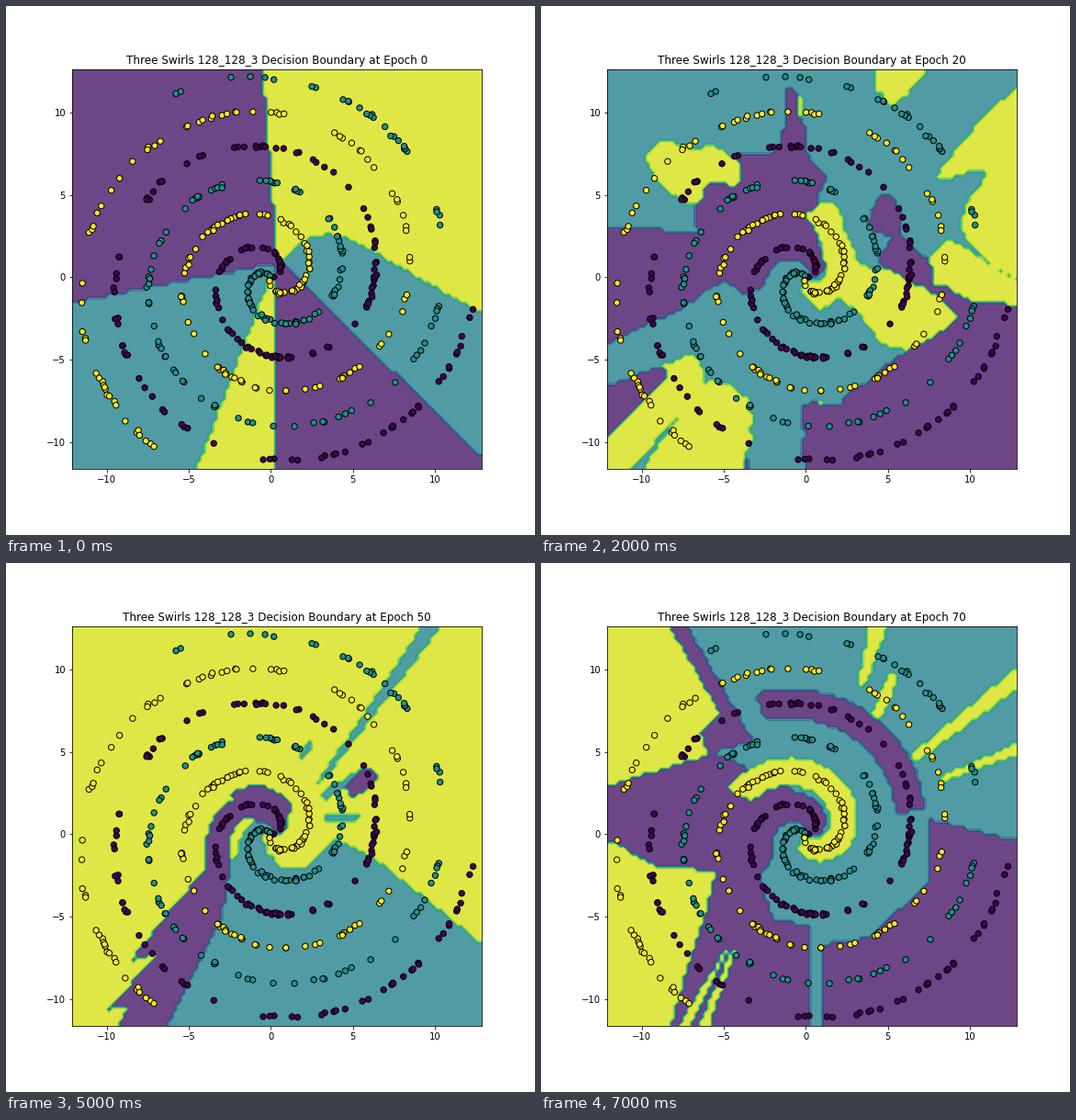
These frames come from a looping animation (576x576 px, 8000 ms). A matplotlib script:

```python
import numpy as np
import matplotlib.pyplot as plt
from matplotlib.animation import FuncAnimation
from matplotlib.path import Path

PURPLE, TEAL, YELLOW = 0, 1, 2
STEP = 0.25
LEFT, BOTTOM = -12.12, -11.63
PHASE = np.array([0, 1, -1]) * 2 * np.pi / 3   # start angle of each arm
rng = np.random.default_rng(4)

xs = LEFT + STEP * np.arange(101)
ys = BOTTOM + STEP * np.arange(98)
gx, gy = np.meshgrid(xs, ys)
# Shapes reach the frame, so the outermost nodes are tested just inside it
px, py = np.clip(gx, -12, 12.7), np.clip(gy, -11.5, 12.5)
radius, angle = np.hypot(px, py), np.arctan2(py, px)


class Field:
    """Class map on the grid, painted shape by shape."""

    def __init__(self, base):
        self.z = np.full(gx.shape, float(base))

    def poly(self, cls, *points):
        inside = Path(points).contains_points(np.column_stack([px.ravel(), py.ravel()]))
        self.z[inside.reshape(gx.shape)] = cls

    def wedge(self, cls, apex, start, stop):
        a = np.degrees(np.arctan2(py - apex[1], px - apex[0])) - start
        self.z[a % 360 < stop - start] = cls

    def streak(self, cls, a, b, wide, tip=None):
        """Line from a to b whose half width runs from wide to tip."""
        tip = wide if tip is None else tip
        dx, dy = b[0] - a[0], b[1] - a[1]
        u = np.clip(((px - a[0]) * dx + (py - a[1]) * dy) / (dx * dx + dy * dy), 0, 1)
        gap = np.hypot(px - a[0] - u * dx, py - a[1] - u * dy)
        self.z[gap < wide + (tip - wide) * u] = cls

    def swirl(self, cls, start, stop, width):
        """Band along the arm of a class."""
        turn = (angle - PHASE[cls]) % (2 * np.pi)
        t = turn + 2 * np.pi * np.round((radius - turn) / (2 * np.pi))
        self.z[(abs(radius - t) < width) & (t >= start) & (t <= stop)] = cls

    def core(self, purple, teal, yellow, width):
        for cls, stop in enumerate((purple, teal, yellow)):
            self.swirl(cls, 0, stop, width)


def epoch_0():
    f = Field(TEAL)
    f.wedge(PURPLE, (0.4, 0.9), 94, 191)
    f.poly(YELLOW, (-0.5, 12.6), (12.9, 12.6), (12.9, -2.2), (5, 2.3), (3.5, 2.7),
           (2, 2.3), (0.4, 0.9))
    f.wedge(PURPLE, (0.3, 1.2), 270, 316)
    f.wedge(YELLOW, (0.3, 0.8), 249, 270)
    return f.z


def epoch_10():
    f = Field(TEAL)
    f.poly(PURPLE, (-8.3, 7.4), (-4.4, 7), (-2, 8.8), (-1.7, 12.6), (-0.8, 12.6),
           (0.5, 7), (3.5, 8), (6.2, 11), (2.5, 5.2), (0.9, 4.5), (0.8, 0.8),
           (-2.5, 2), (-7, 4.6))
    f.streak(PURPLE, (3.3, 2.4), (6.8, 8), 0.7, 0.3)
    f.poly(PURPLE, (4.4, 1.3), (8.5, 1), (12.9, -1.8), (12.9, -11.6), (-0.8, -11.6),
           (-1, -5), (0.5, -7.5), (2, -5.3), (3.6, -6), (8.2, -2.8), (5.7, -1))
    f.poly(PURPLE, (-12.2, 1.5), (-9, 1.3), (-7.4, 0), (-7.4, -0.8), (-12.2, -2.2))
    f.core(3.4, 3.4, 2.6, 0.7)
    f.streak(YELLOW, (1.6, 4.4), (1.6, 1), 0.65)
    f.streak(YELLOW, (2, 1), (5, -2.8), 0.9, 1.4)
    f.streak(YELLOW, (0.8, -1), (0.9, -7.8), 0.7, 0.15)
    f.streak(YELLOW, (-0.3, -3), (-3.6, -10.5), 0.35, 0.2)
    f.poly(YELLOW, (-12.2, -7), (-6.9, -4.4), (-5, -5.6), (-3, -4.6), (-3.6, -11.6),
           (-12.2, -11.6))
    f.poly(YELLOW, (4.4, 12.6), (7.6, 12.6), (4.4, 9.1))
    f.poly(YELLOW, (12.1, 12.6), (9.3, 9), (7.8, 5.8), (12.9, 7.2), (12.9, 12.6))
    f.poly(YELLOW, (12.5, 7.2), (10.5, 4.6), (11.3, 2.2), (12.9, 1.5), (12.9, 7.2))
    return f.z


def epoch_30():
    f = Field(TEAL)
    f.poly(YELLOW, (-12.2, 12.2), (-6.9, 8.4), (-4.5, 9.2), (-4, 7.6), (-0.5, 5.5),
           (1, 4.2), (2.6, 3.5), (-2, 3.2), (-4.5, 4.1), (-12.2, 4.6))
    f.poly(PURPLE, (-12.2, 4.6), (-6, 4.2), (0, 3), (0.7, 0.7), (-2, 1.2), (-5.5, -2),
           (-12.2, -5.6))
    f.poly(PURPLE, (-12.2, -6.2), (-6.4, -4.6), (-8, -7), (-12.2, -11.6))
    f.poly(YELLOW, (12.9, 10.2), (6.5, 5), (11.3, 7), (7.5, 3), (7, 0.8), (2, 0.8),
           (2, -1.5), (3.5, -2), (5.6, -4.6), (12.9, -3.7))
    f.poly(PURPLE, (12.9, -2.1), (11.2, -2.1), (11.8, -3.7), (8.5, -3.7), (4.3, -5.9),
           (3.5, -8.4), (1, -11.6), (12.9, -11.6))
    f.poly(PURPLE, (4.4, 4.6), (6.7, 4.8), (7.4, 0.8), (4.3, 0.8))
    f.core(3.4, 3.4, 4.2, 0.8)
    for foot, top in ((-8, -5.2), (-4.8, -3.2), (-3.6, -2.2)):
        f.streak(PURPLE, (foot, -11.6), (top, -7.4), 0.35, 0.2)
    f.streak(PURPLE, (-6, 10.8), (-4, 7.6), 0.15, 0.35)
    f.streak(YELLOW, (-0.4, 12.6), (-0.1, 4.5), 0.4, 0.3)
    f.streak(PURPLE, (-0.6, 8.8), (-0.1, 4.9), 0.2)
    f.streak(PURPLE, (3.1, 5), (4, 6.9), 0.35)
    f.streak(YELLOW, (4.5, 12.6), (3.6, 9.8), 0.55, 0.2)
    f.streak(YELLOW, (6.4, 12.6), (5.5, 10.8), 0.7, 0.2)
    f.streak(YELLOW, (0.8, -7.6), (0.5, -10.9), 0.2)
    return f.z


def epoch_40():
    f = Field(YELLOW)
    f.poly(TEAL, (-12.2, 12.6), (-2.2, 12.6), (-1.8, 9), (-3, 6.5), (-6.8, 6.2),
           (-4.3, 3.8), (-4.2, 1.9), (-6.7, 1.8), (-7.2, 2.9), (-12.2, 4.9))
    f.streak(TEAL, (-4, 1.5), (-3.6, -2.3), 0.5)
    f.streak(PURPLE, (-5.9, 1.3), (-4.7, 0.7), 0.5)
    f.poly(PURPLE, (-5.6, -11.6), (-3.2, -6), (-1.5, -3.6), (0.1, -4.7), (0.1, -11.6))
    f.poly(PURPLE, (1, -11.6), (1, -6), (3.5, -4), (6.5, -2), (7, -0.2), (9, 0.5),
           (12.9, -0.1), (12.9, -11.6))
    f.streak(YELLOW, (1.9, -5), (4.6, -11.6), 0.35, 1)
    f.streak(YELLOW, (6, -2), (7.7, -3.8), 0.25, 0.1)
    f.swirl(TEAL, 4, 5, 0.7)
    f.core(4.2, 3.6, 5, 0.75)
    f.streak(TEAL, (1, -2.6), (1.4, -4.4), 0.7, 0.5)
    f.streak(TEAL, (-5.2, -7.7), (-1, -2.8), 0.2)
    f.streak(PURPLE, (3.4, 7.3), (4.6, 5), 0.5, 0.9)
    f.streak(PURPLE, (4.6, 5), (6.6, 1.5), 0.9)
    f.streak(PURPLE, (6.6, 1.5), (9.5, 0), 0.9, 0.4)
    f.streak(PURPLE, (-0.8, 8), (-0.1, 5.7), 0.2, 0.4)
    f.streak(PURPLE, (1, 7.3), (0.9, 5.5), 0.25)
    f.poly(TEAL, (8.6, 12.6), (12.9, 12.6), (7.3, 6.4), (6.2, 8.4))
    f.streak(TEAL, (12.1, 11.8), (10.3, 8.9), 0.2)
    f.streak(TEAL, (12.5, 6.8), (8, 3.8), 0.2, 0.4)
    f.streak(TEAL, (12.9, 3.6), (8, 2.3), 0.5, 0.3)
    f.streak(TEAL, (12.9, 0.4), (8.5, 1.8), 0.4, 0.3)
    return f.z


def epoch_50():
    f = Field(YELLOW)
    f.poly(TEAL, (-0.5, -0.3), (0.6, -2), (2, -2), (4, -0.2), (6.3, -1.4), (12.9, -6.6),
           (12.9, -11.6), (-6.3, -11.6), (-3, -5), (-2.4, -1.5))
    f.poly(PURPLE, (-3.2, -1), (-8.6, -7.7), (-6.9, -7.2), (-10, -10.7), (-8.6, -10.4),
           (-9.3, -11.6), (-6.3, -11.6), (-3, -5), (-2.4, -1.5))
    f.swirl(PURPLE, 0.8, 2.4, 1.2)
    f.core(3.8, 3.2, 3, 0.75)
    f.streak(TEAL, (9.8, 12.6), (3, 3.2), 0.5, 0.15)
    f.streak(TEAL, (3.5, 1), (5.2, 1), 0.22)
    f.streak(TEAL, (1.9, 4.7), (2.4, 5.6), 0.22)
    f.streak(TEAL, (3.4, 2.4), (5.5, 3.8), 0.3, 0.2)
    f.streak(PURPLE, (5.1, 2.8), (5.9, 3.5), 0.5)
    return f.z


def epoch_70():
    f = Field(PURPLE)
    f.poly(YELLOW, (-12.2, 12.6), (-8.3, 12.6), (-5.3, 7.4), (-6.4, 6.2), (-6, 4.8),
           (-9, 3.9), (-12.2, 2.9))
    f.poly(YELLOW, (-12.2, -0.3), (-9, -2), (-5.5, -2.2), (-6.2, -5), (-7.5, -9),
           (-8.2, -11.6), (-12.2, -11.6))
    f.poly(TEAL, (-7.2, 12.6), (12.9, 12.6), (12.9, -0.4), (7.6, 0.9), (7.4, -3),
           (3.8, -6.3), (0.9, -6.7), (0.9, -11.6), (0.2, -11.6), (0.2, -5.5),
           (-2, -5.2), (-2.8, -2.5), (-1.4, -0.5), (0.5, 1), (-1, 3), (-5.7, 5),
           (-3.2, 5.6))
    f.swirl(PURPLE, 6.5, 8.2, 0.9)
    f.core(3.5, 3.4, 4.7, 0.85)
    f.streak(YELLOW, (4.4, 12.6), (3.4, 9.1), 0.5, 0.2)
    f.streak(YELLOW, (5.3, 9.5), (4.4, 7.4), 0.3)
    f.streak(YELLOW, (12.9, 9.5), (6.8, 4.8), 0.5, 0.25)
    f.streak(YELLOW, (12.9, 5.2), (8.4, 3.4), 0.3, 0.15)
    for foot, top in ((-7.4, -4.8), (-6.2, -4.4)):
        f.streak(YELLOW, (foot, -11.6), (top, -7), 0.3, 0.1)
    return f.z


def soften(a):
    for _ in range(6):
        p = np.pad(a, 1, mode="edge")
        a = (p[:-2, 1:-1] + p[2:, 1:-1] + p[1:-1, :-2] + p[1:-1, 2:] + 4 * a) / 8
    return a


def between(a, b):
    votes = [soften((a == c) * 1.0) + soften((b == c) * 1.0) for c in range(3)]
    return np.argmax(votes, axis=0).astype(float)


def arm(cls, count=170):
    t = rng.uniform(0, 4 * np.pi, count)
    r = t + rng.normal(0.06, 0.05, count)
    return r * np.cos(t + PHASE[cls]), r * np.sin(t + PHASE[cls])


e10, e30, e50, e70 = epoch_10(), epoch_30(), epoch_50(), epoch_70()
grids = [epoch_0(), e10, between(e10, e30), e30, epoch_40(), e50, between(e50, e70), e70]

fig, ax = plt.subplots(figsize=(8, 8), dpi=72)
fig.subplots_adjust(left=0.125, right=0.9, bottom=0.125, top=0.88)
for cls in (PURPLE, TEAL, YELLOW):
    x, y = arm(cls)
    ax.scatter(x, y, c=np.full(x.size, cls), s=40, cmap="viridis", vmin=0, vmax=2,
               edgecolors="black", zorder=2)
ax.set_xlim(xs[0], xs[-1])
ax.set_ylim(ys[0], ys[-1])
fills = []


def draw(i):
    while fills:
        fills.pop().remove()
    fills.append(ax.contourf(gx, gy, grids[i], levels=np.linspace(0, 2, 9),
                             cmap="viridis", alpha=0.8))
    ax.set_title(f"Three Swirls 128_128_3 Decision Boundary at Epoch {10 * i}")


anim = FuncAnimation(fig, draw, frames=len(grids), interval=1000, repeat=True)
plt.show()
```
